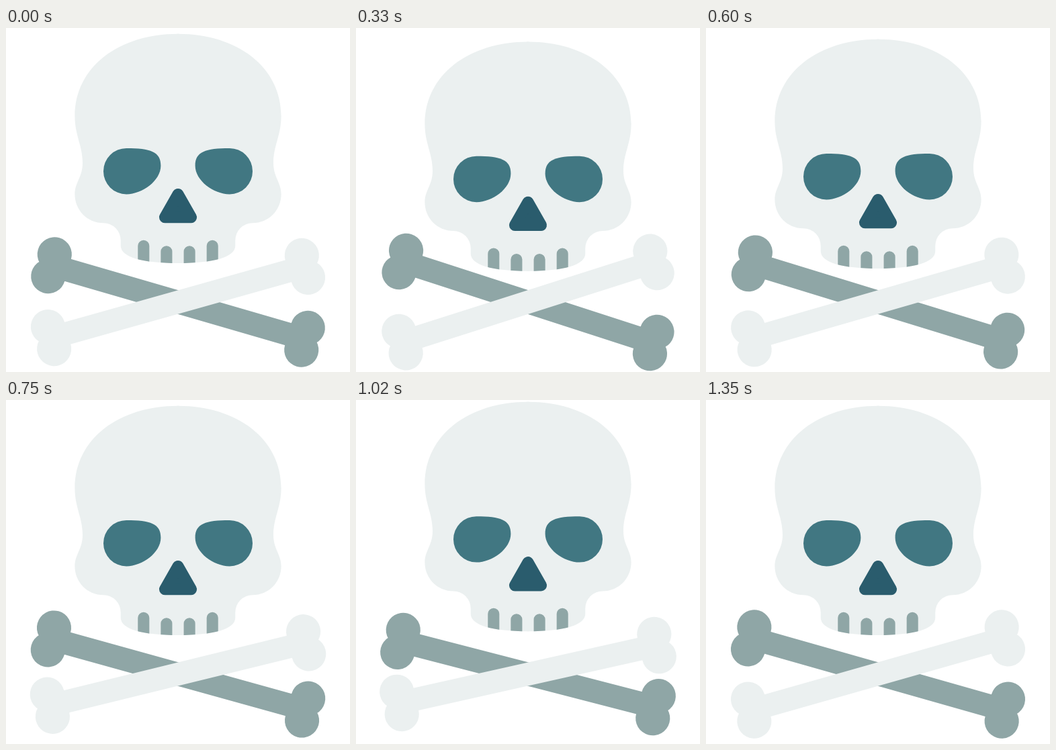
An HTML page with a canvas for the animation above (1380 ms loop, 512x512 px).

```html
<!DOCTYPE html>
<html>
<head>
<meta charset="utf-8">
<style>
  html, body { margin: 0; width: 100%; height: 100%; overflow: hidden; background: #fff; }
  canvas { display: block; width: 100vmin; height: 100vmin; }
</style>
</head>
<body>
<canvas id="stage" width="512" height="512"></canvas>
<script>
const ctx = document.getElementById('stage').getContext('2d');
const LOOP = 1380, STEP = 30, LEG = 450;
const UNIT = 512 / 60;
const BONE = '#ebf0f0', SHADE = '#8fa6a6', EYE = '#417782', NOSE = '#2a5c6d';

// Left half; it reaches slightly past the middle so the halves join without a seam.
const halfSkull = new Path2D(
  'M256 8.7 C168 8.7 102.4 58 102.4 131 C102.4 160 114 175 114 201' +
  ' C114 222 102.4 230 102.4 247.5 C102.4 271 121 290.3 145 290.3' +
  ' A25.7 25.7 0 0 1 170.7 316 V324 C170.7 341 203 350 256 350 H258 V8.7 Z');
const eye = new Path2D(
  'M179.2 179 C215 179 230.4 184 230.4 205 C230.4 227 203 247.4 179.2 247.4' +
  ' A34.2 34.2 0 0 1 179.2 179 Z');
const nose = new Path2D('M256 247.5 L275.5 281.8 H236.5 Z');
const teeth = new Path2D('M204.8 324.2 V370 M238.9 332.7 V370');

const bone = new Path2D();
bone.rect(-23 * UNIT, -2 * UNIT, 46 * UNIT, 4 * UNIT);
for (const side of [-1, 1]) {
  for (const edge of [-1, 1]) {
    const x = side * 23 * UNIT, y = edge * 2 * UNIT;
    bone.moveTo(x + 3 * UNIT, y);
    bone.arc(x, y, 3 * UNIT, 0, Math.PI * 2);
  }
}

// Moves at even speed through the poses, one leg after another.
function glide(t, ...poses) {
  const leg = Math.min(Math.floor(t / LEG), poses.length - 2);
  const part = Math.min(t / LEG - leg, 1);
  return poses[leg] + (poses[leg + 1] - poses[leg]) * part;
}

function fill(path, color) {
  ctx.fillStyle = color;
  ctx.fill(path);
}

function stroke(path, color) {
  ctx.strokeStyle = color;
  ctx.stroke(path);
}

function drawBone(degrees, color) {
  ctx.save();
  ctx.translate(256, 408);
  ctx.rotate(degrees * Math.PI / 180);
  fill(bone, color);
  ctx.restore();
}

function drawHalf(side) {
  ctx.save();
  ctx.translate(256, 0);
  ctx.scale(side, 1);
  ctx.translate(-256, 0);
  fill(halfSkull, BONE);
  fill(eye, EYE);
  ctx.clip(halfSkull);
  stroke(teeth, SHADE);
  ctx.restore();
}

function drawSkull(y) {
  ctx.save();
  ctx.translate(0, y);
  ctx.lineJoin = ctx.lineCap = 'round';
  ctx.lineWidth = 2 * UNIT;
  drawHalf(1);
  drawHalf(-1);
  fill(nose, NOSE);
  stroke(nose, NOSE);
  ctx.restore();
}

function draw(now) {
  const t = Math.floor(now % LOOP / STEP) * STEP;
  ctx.fillStyle = '#fff';
  ctx.fillRect(0, 0, 512, 512);
  drawSkull(glide(t, 0, 16, -8, 0));
  drawBone(glide(t, 16.2, 18.6, 14, 15.85), SHADE);
  drawBone(glide(t, -15.7, -18.4, -11.45, -15.85), BONE);
}

const start = performance.now();
function tick() {
  draw(performance.now() - start);
  requestAnimationFrame(tick);
}
tick();
</script>
</body>
</html>
```
